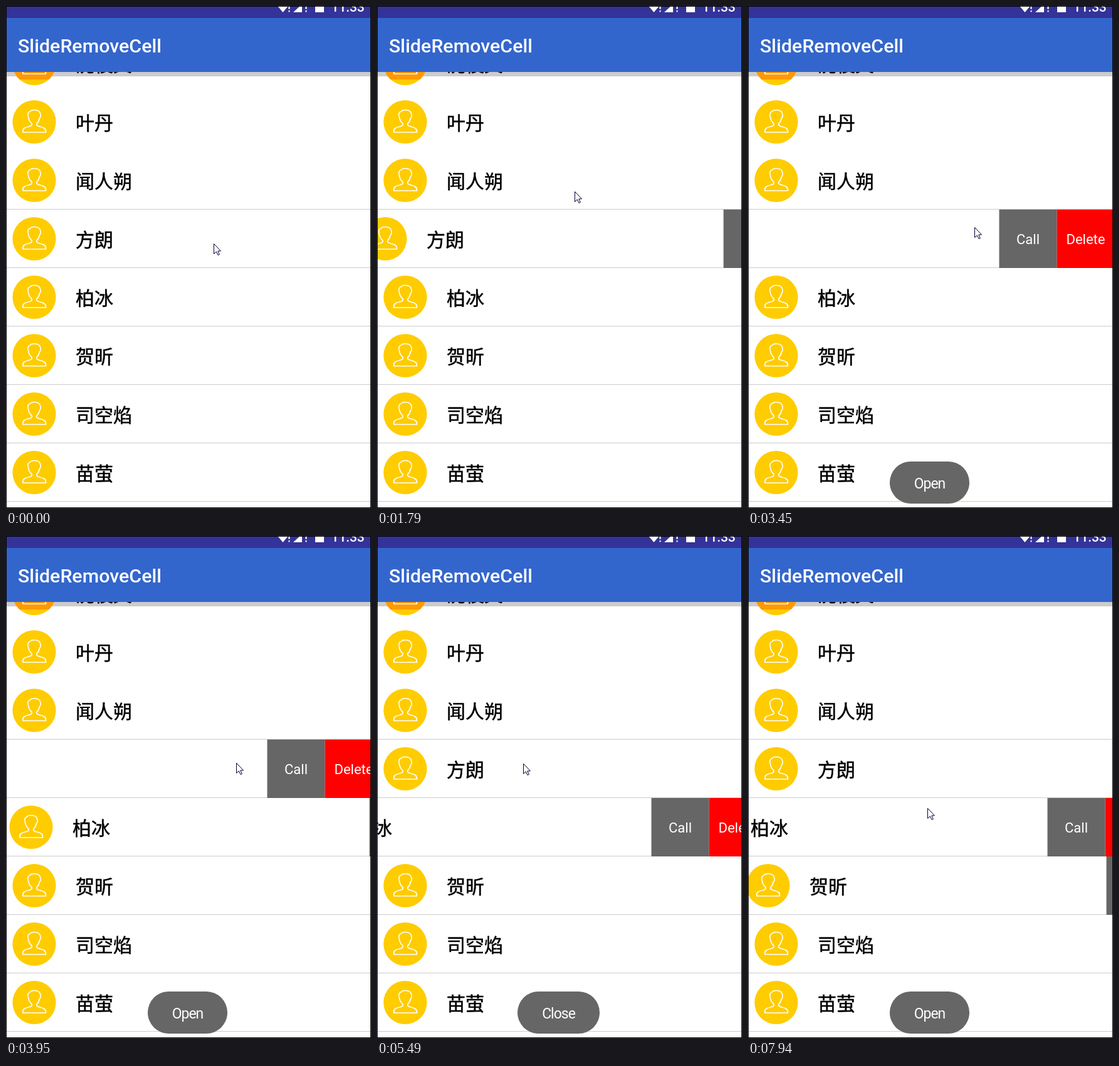
Recreate the animation shown at these times as an HTML page. Size 582 by 799 pixels, loop 8000 ms.

```html
<!DOCTYPE html>
<html lang="zh-CN">
<head>
<meta charset="utf-8">
<title>Swipe list</title>
<style>
html, body { margin: 0; width: 100%; height: 100%; overflow: hidden; background: #fff; }
svg { display: block; width: 100%; height: 100%; font-family: Roboto, sans-serif; }
.name { font: 500 30px "Noto Sans CJK SC", "Noto Sans CJK", sans-serif; stroke: #000; stroke-width: .5; }
.button { font-size: 22px; fill: #fff; text-anchor: middle; }
.toast { font-size: 23px; letter-spacing: -1px; fill: #fff; text-anchor: middle; }
.icon { fill: none; stroke: #fff; stroke-width: 1.7; stroke-linejoin: round; }
</style>
</head>
<body>
<svg id="stage" viewBox="0 0 582 799">
  <defs>
    <clipPath id="shade"><rect y="105" width="582" height="12"/></clipPath>
    <path id="bust" class="icon" d="M-18 16.500H18.500C19 11 16 9 9 7.500C4 6 3 5 4 2.500C7 0 8 -3 8.500 -6C11 -8 10.500 -10 10 -12C9.500 -17 5 -19 0 -19C-4 -19 -5 -18.500 -6 -17C-10 -16 -11 -12 -9.500 -8C-9 -4 -7 0 -4 2.500C-3 5 -4 6 -9 7.500C-16 9 -19 11 -18 16.500Z"/>
  </defs>
  <rect width="582" height="799" fill="#fff"/>
  <rect y="105" width="582" height="7" fill="#ccc"/>
  <g id="list"></g>
  <rect width="582" height="20" fill="#339"/>
  <rect y="19" width="582" height="86" fill="#36c"/>
  <g fill="#fff">
    <text x="19" y="74" font-size="30.400" font-weight="500">SlideRemoveCell</text>
    <path d="M433 0H450L441.500 10ZM458 10L472 -3V10ZM493 0H507V10H493Z"/>
    <path d="M450.500 0h2v5h-2zm0 7h2v2.500h-2zM477.500 0h2v5h-2zm0 7h2v2.500h-2z"/>
    <text x="518.500" y="9" font-size="21" font-weight="500">11:33</text>
  </g>
  <g id="toast">
    <rect id="pill" y="725" height="67" rx="33.500" fill="#666"/>
    <text id="message" class="toast" x="289.500" y="768"></text>
  </g>
  <path id="cursor" d="M.5 .5V16.500L4.300 13L7 18.500L9.300 17.500L6.800 12H11.500Z" fill="#fff" stroke="#003"/>
  <rect x=".5" y=".5" width="581" height="798" fill="none" stroke="#000"/>
</svg>
<script>
const LOOP = 8000, PITCH = 93, OPEN = 184, EDGE = 584.5;
const $ = id => document.getElementById(id);
const clamp = (v, max = 1) => Math.max(0, Math.min(max, v));
const names = ['沈梭文', '叶丹', '闻人朔', '方朗', '柏冰', '贺昕', '司空焰', '苗萤'];

const button = (x, y, color, label) =>
  `<rect x="${x}" y="${y - 46.5}" width="92" height="93" fill="${color}"/>
   <text class="button" x="${x + 46}" y="${y + 8.5}">${label}</text>`;

function row(name, i) {
  const y = 91.5 + PITCH * i;
  const disc = extra => `<circle cx="45" cy="${y}" r="34.6" ${extra}/>`;
  const line = i > 1 ? `<rect y="${y + 45.5}" width="582" height="1" fill="#ccc"/>` : '';
  return `${line}<g id="row${i}">
    ${disc('fill="#fc0"')}${disc('fill="#f90" clip-path="url(#shade)"')}
    <use href="#bust" x="45" y="${y}"/>
    <text class="name" x="111" y="${y + 12.5}">${name}</text>
    ${button(EDGE, y, '#666', 'Call')}${button(EDGE + 92, y, '#f00', 'Delete')}
  </g>`;
}
$('list').innerHTML = names.map(row).join('');

// The screen refreshes twice per beat; on idle beats it stands still.
const BEAT = 411.6, FIRST = 117, ECHO = 90, IDLE = [3, 10];
function refreshTime(t) {
  if (t < FIRST) return 0;
  const beat = Math.floor((t - FIRST) / BEAT);
  const begin = FIRST + beat * BEAT;
  if (IDLE.includes(beat)) return begin - BEAT + ECHO;
  return t < begin + ECHO ? begin : begin + ECHO;
}

// Turning points of the pointer: time, x, y.
const path = [
  [0, 331, 378], [200, 333, 368], [600, 359, 295], [940, 340, 295], [1763, 315, 295],
  [2270, 180, 294], [2587, 174, 293], [3100, 318, 348], [3410, 361, 352], [3500, 381, 347],
  [3911, 367, 361], [4645, 355, 361], [5468, 233, 362], [5558, 190, 365], [5970, 181, 369],
  [6703, 248, 412], [7204, 327, 431], [7525, 298, 433], [LOOP, 284, 433]
];
function pointer(t) {
  const i = path.findIndex(p => p[0] > t);
  const [a, b] = [path[i - 1], path[i]];
  const p = (t - a[0]) / (b[0] - a[0]);
  return [1, 2].map(n => Math.round(a[n] + (b[n] - a[n]) * p));
}

// A row follows the pointer, snaps open on release and closes at the next press.
const swipes = [
  { row: 3, grab: 347, press: 900, release: 2100 },
  { row: 4, grab: 372, press: 3835, release: 5420 },
  { row: 5, grab: 299, press: 7561, release: LOOP }
];
const SNAP = 270, CLOSE = 900;
function offset(i, t, x) {
  const { grab, press, release } = swipes[i];
  if (t < press) return 0;
  const next = swipes[i + 1];
  if (next && t >= next.press) return OPEN * (1 - clamp((t - next.press) / CLOSE));
  const drag = clamp(grab - x, OPEN);
  return drag + (OPEN - drag) * clamp((t - release) / SNAP);
}

// Toasts alternate at a steady pace, fading in and out.
const TOAST = { first: 2900, every: 2057, life: 1770, fade: 250 };
function drawToast(t) {
  const n = Math.floor((t - TOAST.first) / TOAST.every);
  const age = t - TOAST.first - n * TOAST.every;
  const label = n % 2 ? 'Close' : 'Open';
  const width = n % 2 ? 131 : 127;
  const alpha = n < 0 ? 0 : clamp(Math.min(age, TOAST.life + TOAST.fade - age) / TOAST.fade);
  $('pill').setAttribute('x', 289.5 - width / 2);
  $('pill').setAttribute('width', width);
  $('message').textContent = label;
  $('toast').setAttribute('opacity', alpha);
}

function draw(time) {
  const t = refreshTime(time);
  const [x, y] = pointer(t);
  $('cursor').setAttribute('transform', `translate(${x} ${y})`);
  swipes.forEach((s, i) =>
    $('row' + s.row).setAttribute('transform', `translate(${-Math.round(offset(i, t, x))} 0)`));
  drawToast(t);
}

const start = performance.now();
function tick() {
  draw((performance.now() - start) % LOOP);
  requestAnimationFrame(tick);
}
tick();
</script>
</body>
</html>
```
